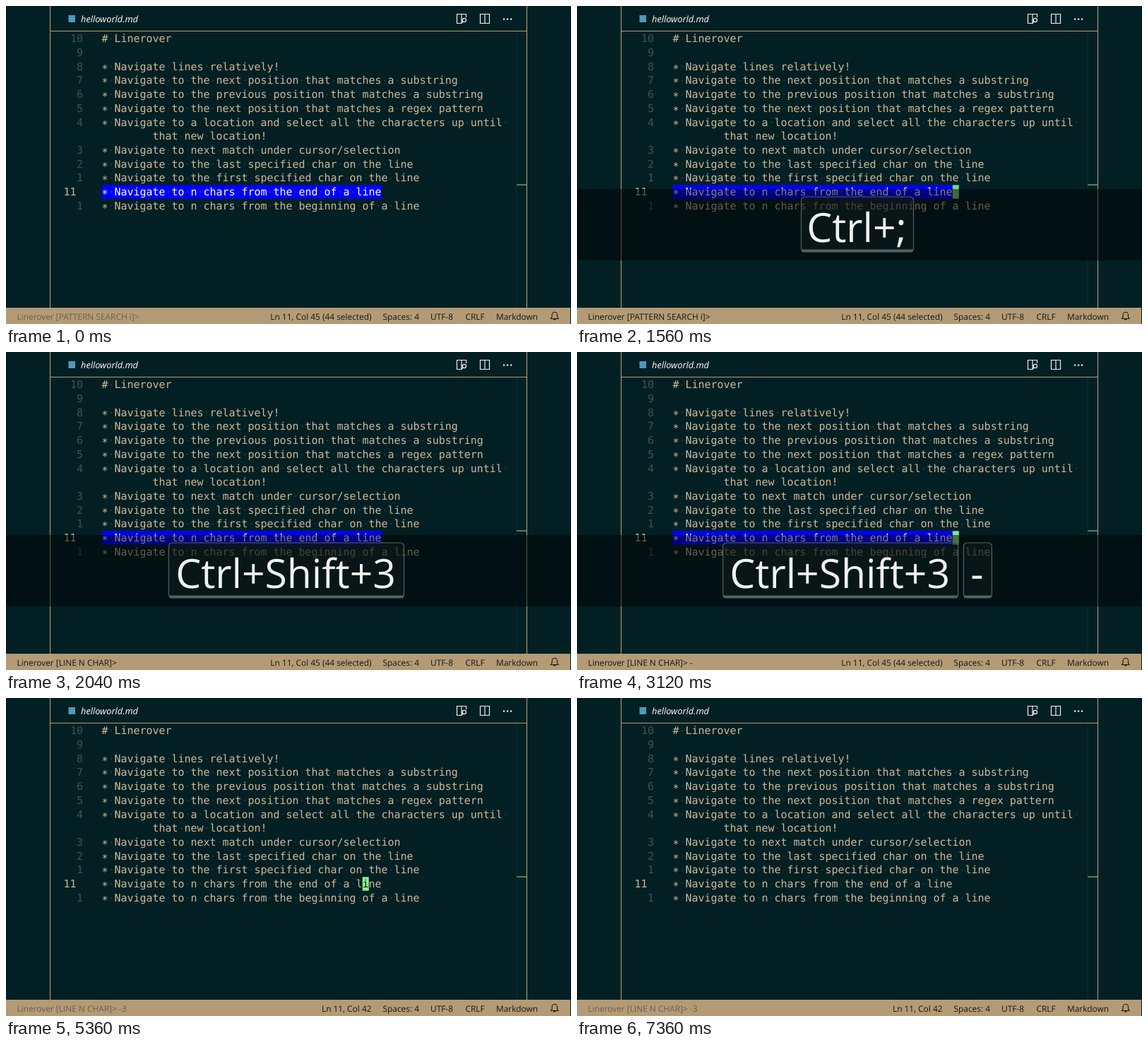
An HTML page with a canvas that plays this animation: 800 by 450 pixels, repeating every 7.44 s.

```html
<!DOCTYPE html>
<html lang="en">
<head>
<meta charset="utf-8">
<title>Editor navigation</title>
<style>
html, body { margin: 0; width: 100%; height: 100%; overflow: hidden; background: #022024; }
canvas { display: block; }
</style>
</head>
<body>
<canvas id="stage" width="800" height="450"></canvas>
<script>
const ctx = document.getElementById('stage').getContext('2d');
ctx.textRendering = 'geometricPrecision';

const LOOP = 7440;
const BG = '#022024', TAN = '#b49b75', TEXT = '#d1b897', DIM = '#41524d', DOT = '#37493f', GREEN = '#90ee90';
const MONO = '14.96px "DejaVu Sans Mono", monospace';
const SANS = '"Open Sans", "Noto Sans", sans-serif';
const LEFT = 135.5, CHAR = 9.006, TOP = 36.3, ROW = 19.7, ACTIVE = 11;

const lines = [
  ['10', '# Linerover'],
  ['9', ''],
  ['8', '∗ Navigate lines relatively!'],
  ['7', '∗ Navigate to the next position that matches a substring'],
  ['6', '∗ Navigate to the previous position that matches a substring'],
  ['5', '∗ Navigate to the next position that matches a regex pattern'],
  ['4', '∗ Navigate to a location and select all the characters up until '],
  ['', 'that new location!', 8],
  ['3', '∗ Navigate to next match under cursor/selection'],
  ['2', '∗ Navigate to the last specified char on the line'],
  ['1', '∗ Navigate to the first specified char on the line'],
  ['11', '∗ Navigate to n chars from the end of a line'],
  ['1', '∗ Navigate to n chars from the beginning of a line']
];

const keyWidths = { 'Ctrl+;': 160, 'Ctrl+Shift+3': 334, '-': 41, '3': 48, 'Enter': 150 };

// Moments of the key presses
const FOCUS = 1240, SHOW = 1440, MODE = 1640, MINUS = 2800, THREE = 3280, ENTER = 3700;

const clamp = v => Math.max(0, Math.min(1, v));
const ease = v => v * v * (3 - 2 * v);

function rect(color, x, y, w, h) {
  ctx.fillStyle = color;
  ctx.fillRect(x, y, w, h);
}

function write(s, x, y, font, color, align = 'left') {
  ctx.font = font;
  ctx.fillStyle = color;
  ctx.textAlign = align;
  ctx.fillText(s, x, y);
}

function stroke(path, color, width) {
  ctx.strokeStyle = color;
  ctx.lineWidth = width;
  ctx.stroke(new Path2D(path));
}

// Fading block cursor; each command restarts its 800 ms cycle
function cursorAlpha(t) {
  const start = t < FOCUS ? 400 : t < MODE ? 1420 : t < ENTER ? MODE : ENTER;
  const phase = (((t - start) % 800) + 800) % 800;
  return 1 - ease(clamp((Math.min(phase, 800 - phase) - 80) / 280));
}

function drawFrame() {
  rect(BG, 0, 0, 800, 450);
  rect('#5199b8', 88.5, 13, 9.5, 10);
  write('helloworld.md', 106, 22.7, 'italic 12.8px ' + SANS, '#fff');
  stroke('M645 24.5H638.5V11.5H651.5V16M645 11.5V24.5M651.5 20a2.6 2.6 0 1 1-5.2 0a2.6 2.6 0 1 1 5.2 0M647 22L644.5 25', '#eee', 1.2);
  stroke('M671.5 11.5H684.5V24.5H671.5ZM678 11.5V24.5', '#eee', 1.2);
  for (const x of [704, 709, 714]) rect('#eee', x, 17.5, 2.2, 2.2);
  rect('#0d2d30', 722.5, 36, 1, 391);
  rect('#62a468', 723, 252.3, 14, 1.5);
  stroke('M62.5 0V427M737.5 0V427M62 35.5H738', TAN, 1.1);
}

function drawText(t) {
  const selected = t < ENTER;
  lines.forEach(([num, text, indent = 0], row) => {
    const active = row === ACTIVE, y = TOP + row * ROW, base = y + 15;
    const x = LEFT + indent * CHAR;
    write(num, active ? 99.5 : 109, base, MONO, active ? TEXT : DIM, 'right');
    if (active && selected) rect('#00f', x, y + .3, text.length * CHAR, 19.4);
    [...text].forEach((c, i) => {
      if (c === ' ') rect(active && selected ? '#4545d0' : DOT, x + (i + .5) * CHAR - .8, y + 9.3, 1.6, 1.6);
    });
    write(text, x, base, MONO, active && selected ? '#fff' : TEXT);
  });

  const col = selected ? 44 : 41, x = LEFT + col * CHAR, y = TOP + ACTIVE * ROW;
  ctx.globalAlpha = cursorAlpha(t);
  rect(GREEN, x, y + .3, CHAR, 19.4);
  write(lines[ACTIVE][1][col] || '', x, y + 15, MONO, BG);
  ctx.globalAlpha = 1;
}

function drawStatus(t) {
  const font = '11.9px ' + SANS, ink = '#141714', y = 443.7;
  const put = (s, x, align, color = ink) => write(s, x, y, font, color, align);
  rect(TAN, 0, 427, 799, 23);
  const mode = t >= MODE ? 'LINE N CHAR' : 'PATTERN SEARCH i';
  const typed = t < MINUS ? '' : t < THREE ? ' -' : ' -3';
  const busy = t >= FOCUS && t < ENTER;
  put(`Linerover [${mode}]>${typed}`, 15.5, 'left', busy ? ink : '#6b604c');
  put(t < ENTER ? 'Ln 11, Col 45 (44 selected)' : 'Ln 11, Col 42', 517.5, 'right');
  put('Spaces: 4', 533.5);
  put('UTF-8', 601);
  put('CRLF', 650.5);
  put('Markdown', 694);
  stroke('M771.5 442.5H782L780.5 440V437a3.7 3.7 0 0 0-7.4 0V440ZM775.3 443a1.6 1.6 0 0 0 3 0', ink, 1.1);
}

function drawKeys(t) {
  const alpha = Math.min(clamp((t - SHOW + 40) / 120), 1 - clamp((t - 4700) / 520));
  if (!alpha) return;
  const keys = t < 1720 ? ['Ctrl+;'] : ['Ctrl+Shift+3'];
  if (t >= MINUS) keys.push('-');
  if (t >= THREE) keys.push('3');
  if (t >= ENTER) keys.push('Enter');

  ctx.globalAlpha = alpha;
  rect('rgba(0,0,0,.5)', 0, 259, 800, 101);
  const gap = 6.7;
  let x = 397 - (keys.reduce((sum, k) => sum + keyWidths[k] + gap, -gap)) / 2;
  for (const key of keys) {
    const w = keyWidths[key];
    ctx.beginPath();
    ctx.roundRect(x + .5, 270, w - 1, 77.5, 5);
    ctx.fillStyle = 'rgba(20,30,30,.4)';
    ctx.fill();
    ctx.strokeStyle = '#53625f';
    ctx.lineWidth = 1.2;
    ctx.stroke();
    ctx.beginPath();
    ctx.roundRect(x + .5, 344.5, w - 1, 4, [0, 0, 4, 4]);
    ctx.fillStyle = '#53625f';
    ctx.fill();
    write(key, x + w / 2 - 1, 333.7, '57px ' + SANS, '#f0f2f0', 'center');
    x += w + gap;
  }
  ctx.globalAlpha = 1;
}

const begin = performance.now();
function tick() {
  const t = (performance.now() - begin) % LOOP;
  drawFrame();
  drawText(t);
  drawStatus(t);
  drawKeys(t);
  requestAnimationFrame(tick);
}
tick();
</script>
</body>
</html>
```
